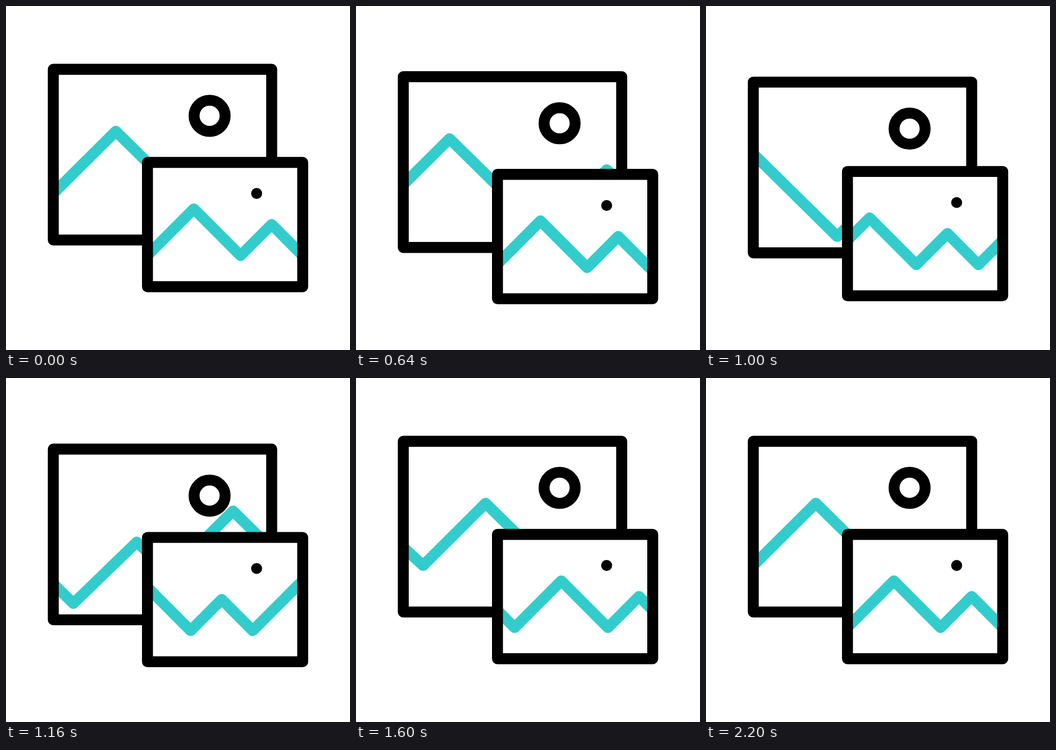
These frames come from a looping animation (640 by 640 pixels, 2.52 s). An HTML page:

```html
<!DOCTYPE html>
<html lang="en">
<head>
<meta charset="utf-8">
<title>Pictures</title>
<style>
  html, body { margin: 0; width: 100%; height: 100%; overflow: hidden; background: #fff; }
  svg { display: block; width: 100%; height: 100%; }
  svg * { stroke-linejoin: round; stroke-linecap: round; }
  .line { fill: none; stroke: #000; stroke-width: 20.4; }
  .hills { stroke: #3cc; }
</style>
</head>
<body>
<svg viewBox="0 0 640 640">
  <clipPath id="bigClip"><rect x="88" y="118" width="406" height="317"/></clipPath>
  <clipPath id="smallClip"><rect x="263" y="291" width="289" height="231"/></clipPath>
  <g id="big">
    <g clip-path="url(#bigClip)"><path class="line hills"/></g>
    <circle class="line" cx="378.8" cy="204.3" r="28.9"/>
    <rect class="line" x="88" y="117.7" width="406.3" height="317.7"/>
  </g>
  <g id="small">
    <rect x="263.2" y="291" width="288.8" height="231.3" fill="#fff"/>
    <g clip-path="url(#smallClip)"><path class="line hills"/></g>
    <circle cx="466.3" cy="348.8" r="10.2"/>
    <rect class="line" x="263.2" y="291" width="288.8" height="231.3"/>
  </g>
</svg>
<script>
const LOOP = 2520, STEP = 40, DROP = 25.6;

// points: one period of the ridge, x relative to startX.
// scroll: start, duration and bezier handles; bob: down start/end, up start/end.
const cards = [
  {
    id: 'big', startX: 204.3, period: 471.5,
    points: [[0, 233], [174.5, 405], [292.5, 290.8], [355, 348.9]],
    scroll: [80.6, 2131, .734, .257], bob: [382, 871, 915, 1452]
  },
  {
    id: 'small', startX: 349.5, period: 289.2,
    points: [[0, 377.4], [86.8, 464.4], [144.7, 406.4], [202.4, 464.4]],
    scroll: [335, 1865, .717, .276], bob: [266, 748, 793, 1319]
  }
];

const clamp = v => Math.min(1, Math.max(0, v));
const smooth = s => s * s * (3 - 2 * s);
const ramp = (t, from, to) => smooth(clamp((t - from) / (to - from)));

// cubic-bezier(x1, 0, x2, 1), solved by bisection
function ease(x, x1, x2) {
  let lo = 0, hi = 1;
  for (let i = 0; i < 30; i++) {
    const s = (lo + hi) / 2, r = 1 - s;
    if (3 * x1 * s * r * r + 3 * x2 * s * s * r + s * s * s < x) lo = s;
    else hi = s;
  }
  return smooth(lo);
}

for (const card of cards) {
  card.group = document.getElementById(card.id);
  card.hills = card.group.querySelector('.hills');
  const ridge = [-1, 0, 1, 2].flatMap(k =>
    card.points.map(([x, y]) => [card.startX + k * card.period + x, y]));
  card.hills.setAttribute('d', 'M' + ridge.join('L'));
}

function draw(now) {
  const t = Math.floor(now % LOOP / STEP) * STEP;
  for (const { group, hills, period, scroll, bob } of cards) {
    const [start, duration, x1, x2] = scroll;
    const shift = period * ease(clamp((t - start) / duration), x1, x2);
    const y = DROP * (ramp(t, bob[0], bob[1]) - ramp(t, bob[2], bob[3]));
    hills.setAttribute('transform', `translate(${-shift} 0)`);
    group.setAttribute('transform', `translate(0 ${y})`);
  }
}

let begin;
function tick(now) {
  begin ??= now;
  draw(now - begin);
  requestAnimationFrame(tick);
}
draw(0);
requestAnimationFrame(tick);
</script>
</body>
</html>
```
